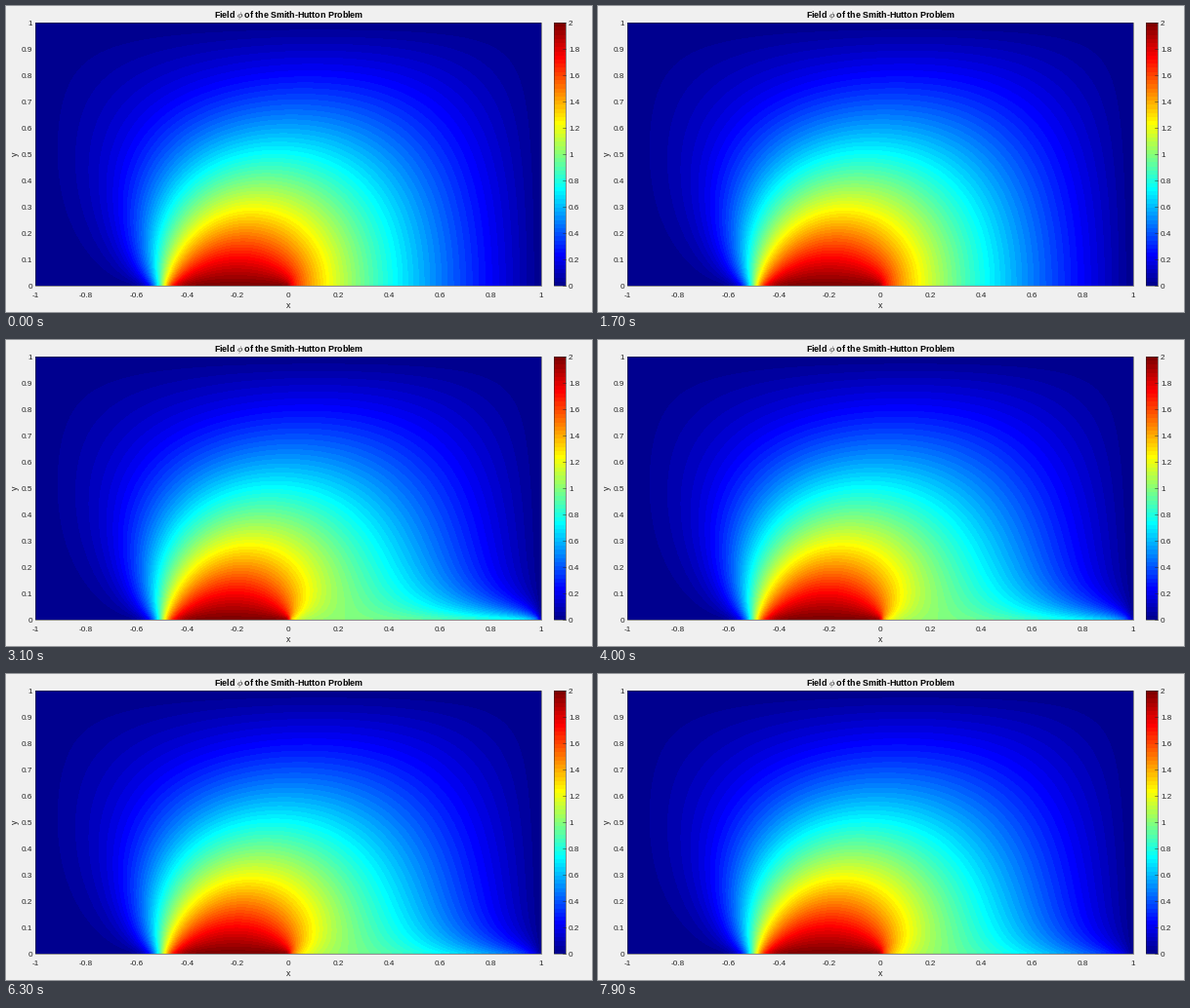
Write a matplotlib script that moves like this. It is 600 px wide and 314 px high and loops after 8000 ms.

```python
import numpy as np
import matplotlib.pyplot as plt
from matplotlib.animation import FuncAnimation
from matplotlib.colors import ListedColormap
from matplotlib.patches import Rectangle

W, H, DPI = 600, 314, 100
FRAMES, STEP_MS = 80, 100
RESET = 18            # frame at which the outlet starts again from phi = 1
RELAX = 0.125         # outlet relaxation per frame
GAMMA = 0.1           # diffusivity, rho / gamma = 10
NY = 100
NX = 2 * NY
INK = "#262626"

plt.rcParams["font.family"] = "Liberation Sans"
plt.rcParams["mathtext.fontset"] = "cm"


def solve_responses():
    """Steady Smith-Hutton field: column 0 is the inlet part of the solution,
    the others the response to a unit value at each outlet node."""
    h = 1 / NY
    y = np.arange(1, NY) * h
    outlet = NY - 1
    upper, rhs = [], []
    for i in range(1, NX):
        x = -1 + i * h
        u = 2 * y * (1 - x * x) * h / 2
        v = -2 * x * (1 - y * y) * h / 2
        west, east = -u - GAMMA, u - GAMMA
        south, north = -v - GAMMA, v - GAMMA
        block = (np.diag(np.full(NY - 1, 4 * GAMMA))
                 + np.diag(south[1:], -1) + np.diag(north[:-1], 1))
        d = np.zeros((NY - 1, 1 + outlet))
        if i <= NY:
            d[0, 0] = -south[0] * (1 + np.tanh(10 * (2 * x + 1)))
        else:
            d[0, i - NY] = -south[0]
        if upper:
            block -= west[:, None] * upper[-1]
            d -= west[:, None] * rhs[-1]
        sol = np.linalg.solve(block, np.hstack([np.diag(east), d]))
        upper.append(sol[:, :NY - 1])
        rhs.append(sol[:, NY - 1:])
    for i in range(NX - 3, -1, -1):
        rhs[i] = rhs[i] - upper[i] @ rhs[i + 1]
    return np.array(rhs)


resp = solve_responses()
near = resp[NY:, 0, :]        # first row of nodes above the outlet
steady = np.linalg.solve(np.eye(NY - 1) - near[:, 1:], near[:, 0])


def outlet_history():
    states = []
    b = steady
    for n in range(FRAMES):
        if n == RESET:
            b = np.ones(NY - 1)
        elif n > RESET:
            b = b + RELAX * (near @ np.r_[1, b] - b)
        states.append(b)
    return states


outlets = outlet_history()
x_in = np.linspace(-1, 0, NY + 1)
inlet = 1 + np.tanh(10 * (2 * x_in + 1))


def field(n):
    phi = np.zeros((NY + 1, NX + 1))
    phi[0, :NY + 1] = inlet
    phi[0, NY + 1:NX] = outlets[n]
    phi[1:NY, 1:NX] = (resp @ np.r_[1, outlets[n]]).T
    return (phi[1:, 1:] + phi[:-1, 1:] + phi[1:, :-1] + phi[:-1, :-1]) / 4


def jet64():
    v = np.arange(1, 65)[:, None] / 64
    return ListedColormap(np.clip(1.5 - np.abs(4 * v - np.array([3, 2, 1])), 0, 1))


def px(size):
    return size * 72 / DPI


fig = plt.figure(figsize=(W / DPI, H / DPI), dpi=DPI, facecolor="#f0f0f0")
ax = fig.add_axes([0, 0, 1, 1])
ax.axis("off")

L, R, T, B = 30, 548, 17, 287
CL, CR = 561, 573
cmap = jet64()
image = ax.imshow(field(0), cmap=cmap, vmin=0, vmax=2, origin="lower",
                  extent=(L, R, B, T), interpolation="bilinear", aspect="auto")
ax.imshow(np.arange(64)[:, None], cmap=cmap, origin="lower",
          extent=(CL, CR, B, T), interpolation="nearest", aspect="auto")
ax.set_xlim(0, W)
ax.set_ylim(H, 0)


def label(x, y, s, size=8.1, ha="center", **kw):
    ax.text(x, y, s, fontsize=px(size), ha=ha, color=kw.pop("color", INK), **kw)


for x0, x1 in ((L, R), (CL, CR)):
    ax.add_patch(Rectangle((x0, T), x1 - x0, B - T, fill=False,
                           ec=INK, lw=px(0.5)))

for k in range(11):
    yk = B - (B - T) * k / 10
    label(L + (R - L) * k / 10, 299, f"{(k - 5) / 5:g}")
    label(27, yk + 3, f"{k / 10:g}", ha="right")
    label(576, yk + 3, f"{k / 5:g}", ha="left")
    ax.plot([CR - 2.7, CR], [yk, yk], color=INK, lw=px(0.5))

label((L + R) / 2, 310.5, "x", 8.9)
label(9.5, 152, "y", 8.9, rotation=90, va="center")
label((L + R) / 2 + 0.5, 12.5, r"Field $\phi$ of the Smith-Hutton Problem", 8.9,
      weight="bold", color="black")


def update(n):
    image.set_data(field(n))
    return (image,)


anim = FuncAnimation(fig, update, frames=FRAMES, interval=STEP_MS,
                     repeat=True, repeat_delay=0, blit=False)
plt.show()
```
